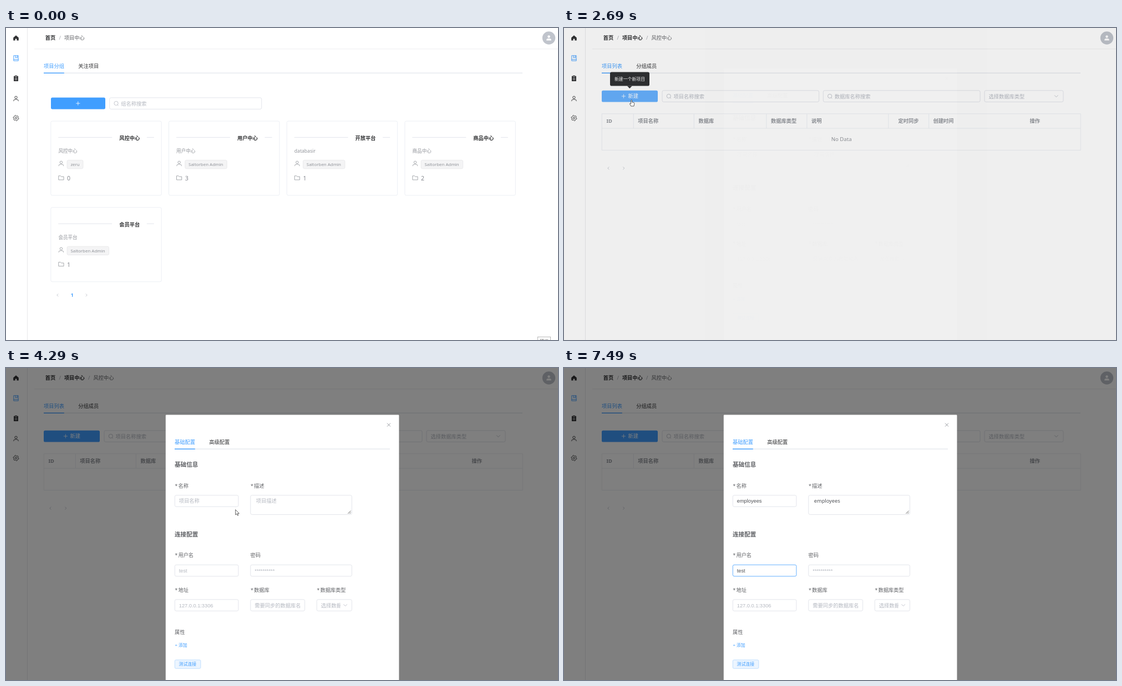
An HTML page that plays this animation: 995x563 px, repeating every 8 s.

```html
<!DOCTYPE html>
<html lang="zh-CN">
<head>
<meta charset="utf-8">
<title>项目中心</title>
<style>
html, body { margin: 0; width: 100%; height: 100%; overflow: hidden; background: #fff; }
svg { display: block; width: 995px; height: 563px; }
text { font-family: "Noto Sans", "Noto Sans CJK SC", sans-serif; white-space: pre; }
text.in { font-family: "Liberation Sans", "Noto Sans CJK SC", sans-serif; }
</style>
</head>
<body>
<svg id="stage" viewBox="0 0 995 563" xmlns="http://www.w3.org/2000/svg"></svg>
<script>
const LOOP = 8000, FS = 9.24;
const BLUE = '#409eff', DARK = '#303133', TEXT = '#606266', GREY = '#909399',
      HINT = '#b4b8c0', EDGE = '#dcdfe6', LINE = '#e8ebf1';
const stage = document.getElementById('stage');

function el(parent, name, attrs = {}, content) {
  const e = document.createElementNS('http://www.w3.org/2000/svg', name);
  for (const k in attrs) e.setAttribute(k, attrs[k]);
  if (content !== undefined) e.textContent = content;
  parent.appendChild(e);
  return e;
}
const set = (e, k, v) => e.setAttribute(k, v);
const show = (e, on) => set(e, 'visibility', on ? 'visible' : 'hidden');
const group = (p, attrs) => el(p, 'g', attrs);
const rect = (p, x, y, w, h, fill, stroke = 'none', rx = 0) =>
  el(p, 'rect', { x, y, width: w, height: h, fill, stroke, rx, 'stroke-width': .8 });
const path = (p, d, stroke, width = .8, fill = 'none') =>
  el(p, 'path', { d, stroke, fill, 'stroke-width': width });
// cy is the middle of the line of text
const text = (p, x, cy, s, fill = TEXT, size = FS, more = {}) =>
  el(p, 'text', { x, y: cy + size * .36, fill, 'font-size': size, ...more }, s);
const BOLD = { 'font-weight': 700 }, FIELD = { class: 'in' };

function icon(p, x, y, d, stroke, fill = 'none', width = .8) {
  const e = path(p, d, stroke, width, fill);
  set(e, 'transform', `translate(${x} ${y})`);
  return e;
}
const USER = 'M-2.2 -2.2a2.2 2.2 0 1 0 4.4 0a2.2 2.2 0 1 0 -4.4 0M-4.2 4.6V3.8Q-4.2 1.4 -1.6 1.4H1.6Q4.2 1.4 4.2 3.8V4.6';
const FOLDER = 'M-4.6 -3.6H-1.2L.3 -2.2H4.6V3.6H-4.6Z';
const LENS = 'M-3.8 -.3a3.6 3.6 0 1 0 7.2 0a3.6 3.6 0 1 0 -7.2 0M2.2 2.3L4 4';
const PLUS = 'M-3.6 0H3.6M0 -3.6V3.6';
const LEFT = 'M1.2 -2.4L-1.2 0L1.2 2.4', RIGHT = 'M-1.2 -2.4L1.2 0L-1.2 2.4', DOWN = 'M-3.2 -1.6L0 1.6L3.2 -1.6';

function field(p, x, y, w, h, hint, pad = 7.5) {
  const box = rect(p, x, y, w, h, '#fff', EDGE, 2.6);
  const label = text(p, x + pad, y + 10.4, hint, HINT, FS, FIELD);
  return { box, label };
}
function search(p, x, y, w, hint) {
  field(p, x, y, w, 20.6, hint, 20.5);
  icon(p, x + 12, y + 10.4, LENS, HINT);
}
function tabs(p, x, y, end, a, b, lineY) {
  text(p, x, y, a, BLUE);
  text(p, x + 62.2, y, b, DARK);
  rect(p, x, lineY - .7, end - x, 1.3, '#e4e7ed');
  rect(p, x, lineY - .7, 36.8, 1.4, BLUE);
}
function crumbs(p, names) {
  let x = 70.8;
  names.forEach((s, i) => {
    const last = i === names.length - 1;
    text(p, x, 18, s, last ? TEXT : DARK, FS, last ? {} : BOLD);
    x += s.length * FS;
    if (!last) text(p, x + 6.2, 18, '/', '#a8abb2');
    x += 15.6;
  });
}

// ---- frame of the page
rect(stage, 0, 0, 995, 563, '#fff');
path(stage, 'M38.5 0V563', '#e4e4e6');
path(stage, 'M51 37.8H995', '#ebebee');
icon(stage, 18, 18, 'M0 -4.8L4.8 -.6V4.6H1.4V1.4H-1.4V4.6H-4.8V-.6Z', 'none', DARK);
icon(stage, 18, 54.5, 'M-4.2 -4.7H4.2V4.7H-4.2ZM-4.2 2.3H4.2M-1 -4.7V-.6L.8 -1.8L2.5 -.6V-4.7', BLUE, 'none', .9);
icon(stage, 18, 91, 'M-4 -4.2H-2V-5.2H2V-4.2H4V5H-4Z', 'none', DARK);
icon(stage, 18, 91, 'M-2 -3.2H2M-2.2 -.2H2.2M-2.2 2.2H2.2', '#fff', .8);
icon(stage, 18, 127.5, USER, DARK, 'none', .9);
const gear = Array.from({ length: 24 }, (_, i) => {
  const a = (i + .5) * Math.PI / 12, r = i % 4 < 2 ? 5 : 3.9;
  return (r * Math.cos(a)).toFixed(2) + ' ' + (r * Math.sin(a)).toFixed(2);
}).join('L');
icon(stage, 18, 162.5, `M${gear}ZM-1.7 0a1.7 1.7 0 1 0 3.4 0a1.7 1.7 0 1 0 -3.4 0`, DARK, 'none', .9);
el(stage, 'circle', { cx: 978.5, cy: 18, r: 11.7, fill: '#c0c4cc' });
icon(stage, 978.5, 18, 'M-2.3 -2.4a2.3 2.3 0 1 0 4.6 0a2.3 2.3 0 1 0 -4.6 0M-4.3 4.5V3.6Q-4.3 1 -1.6 1H1.6Q4.3 1 4.3 3.6V4.5Z', 'none', '#fff');

// ---- group list
const home = group(stage);
crumbs(home, ['首页', '项目中心']);
tabs(home, 68, 69, 931, '项目分组', '关注项目', 81.3);
rect(home, 81, 125.6, 98, 20.8, BLUE, 'none', 2.6);
icon(home, 129.8, 136, PLUS, '#fff');
search(home, 186.7, 125.8, 274, '组名称搜索');

function card(x, y, title, note, owner, count) {
  rect(home, x, y, 199.4, 134, '#fff', LINE, 2.6);
  path(home, `M${x + 13.4} ${y + 29.4}h97M${x + 173} ${y + 29.4}h13`, EDGE);
  text(home, x + 123.4, y + 30.4, title, DARK, FS, BOLD);
  text(home, x + 13.6, y + 54.2, note, GREY, 8.58);
  icon(home, x + 18.6, y + 76.6, USER, GREY);
  rect(home, x + 29.3, y + 70.4, owner.length > 5 ? 75.4 : 28.8, 15.4, '#f4f4f5', '#e6e6e9', 2.4);
  text(home, x + 35.6, y + 78.2, owner, GREY, 7.92);
  icon(home, x + 18.6, y + 102.4, FOLDER, GREY);
  text(home, x + 29.2, y + 103.4, count, '#85888f', 10.56);
}
const ADMIN = 'Saltorben Admin';
[['风控中心', '风控中心', 'zeru', 0], ['用户中心', '用户中心', ADMIN, 3], ['开放平台', 'databasir', ADMIN, 1],
 ['商品中心', '商品中心', ADMIN, 2], ['会员平台', '会员平台', ADMIN, 1]]
  .forEach((c, i) => card(80.8 + 212.7 * (i % 4), i < 4 ? 168 : 323.8, ...c));
icon(home, 93, 482, LEFT, '#b8bcc4');
text(home, 119.2, 482, '1', BLUE, 8.58, { ...BOLD, 'text-anchor': 'middle' });
icon(home, 145, 482, RIGHT, '#b8bcc4');

const hint = group(stage);
rect(hint, 958.4, 557.4, 23.2, 12, '#fff', '#a8a8a8');
text(hint, 962, 565, '预览', '#888', 8);

// ---- project list
const list = group(stage);
crumbs(list, ['首页', '项目中心', '风控中心']);
tabs(list, 68, 69, 931, '项目列表', '分组成员', 81.3);
const addBtn = rect(list, 68, 112.7, 101, 20.8, BLUE, 'none', 2.6);
icon(list, 107.4, 123, PLUS, '#fff');
text(list, 115.4, 122.6, '新建', '#fff');
search(list, 177, 112.8, 282.6, '项目名称搜索');
search(list, 467.3, 112.8, 282.8, '数据库名称搜索');
field(list, 758, 112.8, 142, 20.6, '选择数据库类型');
icon(list, 887.3, 123, DOWN, HINT);
rect(list, 68.2, 154.8, 863, 65.6, '#fff', LINE);
path(list, 'M68 181H931' + [125.3, 234.3, 364.8, 437.8, 584.8, 657.6].map(x => `M${x} 155V181`).join(''), LINE);
[[76.4, 'ID'], [133.2, '项目名称'], [242.6, '数据库'], [373, '数据库类型'], [446, '说明'],
 [602.6, '定时同步'], [665.4, '创建时间'], [839.5, '操作']]
  .forEach(([x, s]) => text(list, x, 168, s, GREY, FS, BOLD));
text(list, 500.2, 200.6, 'No Data', GREY, 9.6, { 'text-anchor': 'middle' });
icon(list, 80, 253, LEFT, '#b8bcc4');
icon(list, 107.6, 253, RIGHT, '#b8bcc4');

const tip = group(list);
rect(tip, 83, 79.4, 71, 25.2, DARK, 'none', 2.8);
path(tip, 'M113.8 104.4H122.8L118.3 109Z', 'none', 0, DARK);
text(tip, 91, 92.2, '新建一个新项目', '#fff', 7.88);

// ---- dialog
const overlay = group(stage);
rect(overlay, 0, 0, 995, 563, 'rgba(0,0,0,.5)');
const dialog = group(overlay);
rect(dialog, 287.8, 84.4, 420.6, 510, '#fff', 'none', 1.4);
icon(dialog, 690, 102.6, 'M-3 -3L3 3M3 -3L-3 3', GREY, 'none', .9);
tabs(dialog, 304, 133.6, 692, '基础配置', '高级配置', 146.2);
text(dialog, 304, 174, '基础信息', TEXT, 10.6, BOLD);
text(dialog, 304, 300, '连接配置', TEXT, 10.6, BOLD);
[[304, 212.6, '名称'], [440.6, 212.6, '描述'], [304, 338, '用户名'], [304, 400.8, '地址'],
 [440.6, 400.8, '数据库'], [560, 400.8, '数据库类型']].forEach(([x, y, s]) => {
  text(dialog, x + .4, y, '*', TEXT, 8.6);
  text(dialog, x + 6.4, y, s);
});
text(dialog, 440.6, 338, '密码');
text(dialog, 304, 476.4, '属性');
const nameBox = field(dialog, 304.3, 229.6, 114.6, 20.6, '项目名称');
const noteBox = field(dialog, 440.8, 229.6, 182.6, 34.8, '项目描述', 10);
const userBox = field(dialog, 304.3, 355.2, 114.6, 20.6, 'test');
field(dialog, 440.8, 355.2, 182.6, 20.6, '**********');
field(dialog, 304.3, 417.8, 114.6, 20.6, '127.0.0.1:3306');
field(dialog, 440.8, 417.8, 97.8, 20.6, '需要同步的数据库名');
field(dialog, 560.2, 417.8, 63.2, 20.6, '选择数据');
rect(dialog, 602.8, 419, 19, 18, '#fff');
icon(dialog, 611.6, 428, DOWN, HINT);
path(dialog, 'M616.4 262.8L621.6 257.6M619.4 262.8L621.6 260.6', '#555', .9);
text(dialog, 304.4, 500.6, '+ 添加', BLUE, 7.92);
rect(dialog, 304.3, 526.8, 46.6, 15.4, '#ecf5ff', '#b3d8ff', 2);
text(dialog, 311.6, 534.4, '测试连接', BLUE, 7.92);
const caret = path(dialog, '', '#333', .8);

// word typed from `start`, one letter every `step`; focused between `on` and `off`
const inputs = [
  { ...nameBox, word: 'employees', start: 4820, step: 44, on: 4570, off: 5350 },
  { ...noteBox, word: 'employees', start: 5450, step: 48, on: 5350, off: 6200, font: '' },
  { ...userBox, word: 'test', start: 6630, step: 110, on: 6200, off: LOOP }
];
inputs.forEach(f => { f.hint = f.label.textContent; });

// ---- pointer
const arrow = path(stage, 'M0 0V9.3L2.2 7.3L3.7 10.6L5.2 9.9L3.7 6.8H6.6Z', '#222', .7, '#fff');
const hand = path(stage, 'M-.9 .8Q0 -.6 .9 .8V4.2L4.4 5Q5.4 5.4 5.2 6.8L4.4 11.4H-.8L-3 7.6Q-3.4 6.4 -2.2 6.4L-.9 7.4Z', '#222', .7, '#fff');
const beam = path(stage, 'M-2 -4.8H-.5L0 -4.4L.5 -4.8H2M0 -4.4V4.4M-2 4.8H-.5L0 4.4L.5 4.8H2', '#222', .8);

// each track: [time, x, y] stops; the pointer is shown from the first to the last
const tracks = [
  [[230, 801, 527], [560, 470, 330], [820, 139, 215], [930, 200, 195], [1020, 221.5, 201.5],
   [1750, 221.5, 201.5], [1990, 158, 134], [2290, 126, 126.5], [2670, 126, 126.5], [2760, 94, 149], [2900, -20, 178]],
  [[3890, 213, 219], [4120, 320, 252], [4330, 423, 256], [4520, 386, 240], [4820, 386, 240]],
  [[5190, 386, 240], [5340, 505.5, 244], [5450, 505.5, 244]],
  [[5860, 505.5, 244], [6180, 353, 366], [6630, 353, 366]],
  [[7230, 353, 366], [7430, 40, 417], [7490, -20, 428]]
];
const clamp = v => Math.max(0, Math.min(1, v));
const smooth = v => v * v * (3 - 2 * v);

function pointerAt(t) {
  const k = tracks.find(a => t >= a[0][0] && t < a[a.length - 1][0]);
  if (!k) return null;
  const i = k.findIndex(s => s[0] > t), a = k[i - 1], b = k[i];
  const u = smooth((t - a[0]) / (b[0] - a[0]));
  return [a[1] + (b[1] - a[1]) * u, a[2] + (b[2] - a[2]) * u];
}
function pointerKind(t, x, y) {
  const inside = (l, top, r, b) => x > l && x < r && y > top && y < b;
  if (t < 1090) return (y > 168 && y < 302 && (x - 81) % 212.7 < 199 && x > 81) || inside(81, 324, 280, 458) ? hand : arrow;
  if (t < 2800) return inside(68, 112, 169, 134) ? hand : arrow;
  const overField = inside(304, 229, 419, 250) || inside(441, 229, 624, 265) ||
    inside(304, 355, 419, 376) || inside(304, 418, 419, 438);
  return overField ? beam : arrow;
}
// the CSS "ease" curve: cubic-bezier(.25, .1, .25, 1)
function ease(x) {
  const bez = (s, a, b) => 3 * s * (1 - s) * (1 - s) * a + 3 * s * s * (1 - s) * b + s * s * s;
  let lo = 0, hi = 1;
  for (let i = 0; i < 20; i++) {
    const m = (lo + hi) / 2;
    if (bez(m, .25, .25) < x) lo = m; else hi = m;
  }
  return bez(lo, .1, 1);
}
function buttonColor(t) {
  if (t < 1990 || t >= 3560) return BLUE;
  return t >= 2560 && t < 2690 ? '#3a8ee6' : '#66b1ff';
}

function draw(t) {
  show(hint, t < 70);
  show(home, t < 1090);
  show(list, t >= 1090);
  set(addBtn, 'fill', buttonColor(t));
  set(tip, 'opacity', clamp((t - 2080) / 180) * (1 - clamp((t - 2840) / 180)));

  const p = ease(clamp((t - 2655) / 300));
  show(overlay, p > 0);
  set(overlay, 'opacity', p);
  set(dialog, 'opacity', p);
  set(dialog, 'transform', `translate(0 ${-13.2 * (1 - p)})`);

  let caretPath = '';
  for (const f of inputs) {
    const n = t < f.start ? 0 : Math.min(f.word.length, 1 + Math.floor((t - f.start) / f.step));
    const focus = t >= f.on && t < f.off;
    f.label.textContent = n ? f.word.slice(0, n) : f.hint;
    set(f.label, 'fill', n ? '#505257' : HINT);
    if (f.font !== undefined && n) f.label.removeAttribute('class');
    else set(f.label, 'class', 'in');
    set(f.box, 'stroke', focus ? BLUE : EDGE);
    const last = n ? f.start + (n - 1) * f.step : f.on;
    if (focus && t - last < 530) {
      const x = +f.label.getAttribute('x') + (n ? f.label.getComputedTextLength() + .4 : 0);
      caretPath = `M${x} ${+f.box.getAttribute('y') + 4.6}v11.4`;
    }
  }
  set(caret, 'd', caretPath);

  const at = pointerAt(t), kind = at && pointerKind(t, ...at);
  for (const c of [arrow, hand, beam]) {
    show(c, c === kind);
    if (c === kind) set(c, 'transform', `translate(${at[0]} ${at[1]})`);
  }
}

const began = performance.now();
function tick() {
  draw((performance.now() - began) % LOOP);
  requestAnimationFrame(tick);
}
tick();
</script>
</body>
</html>
```
